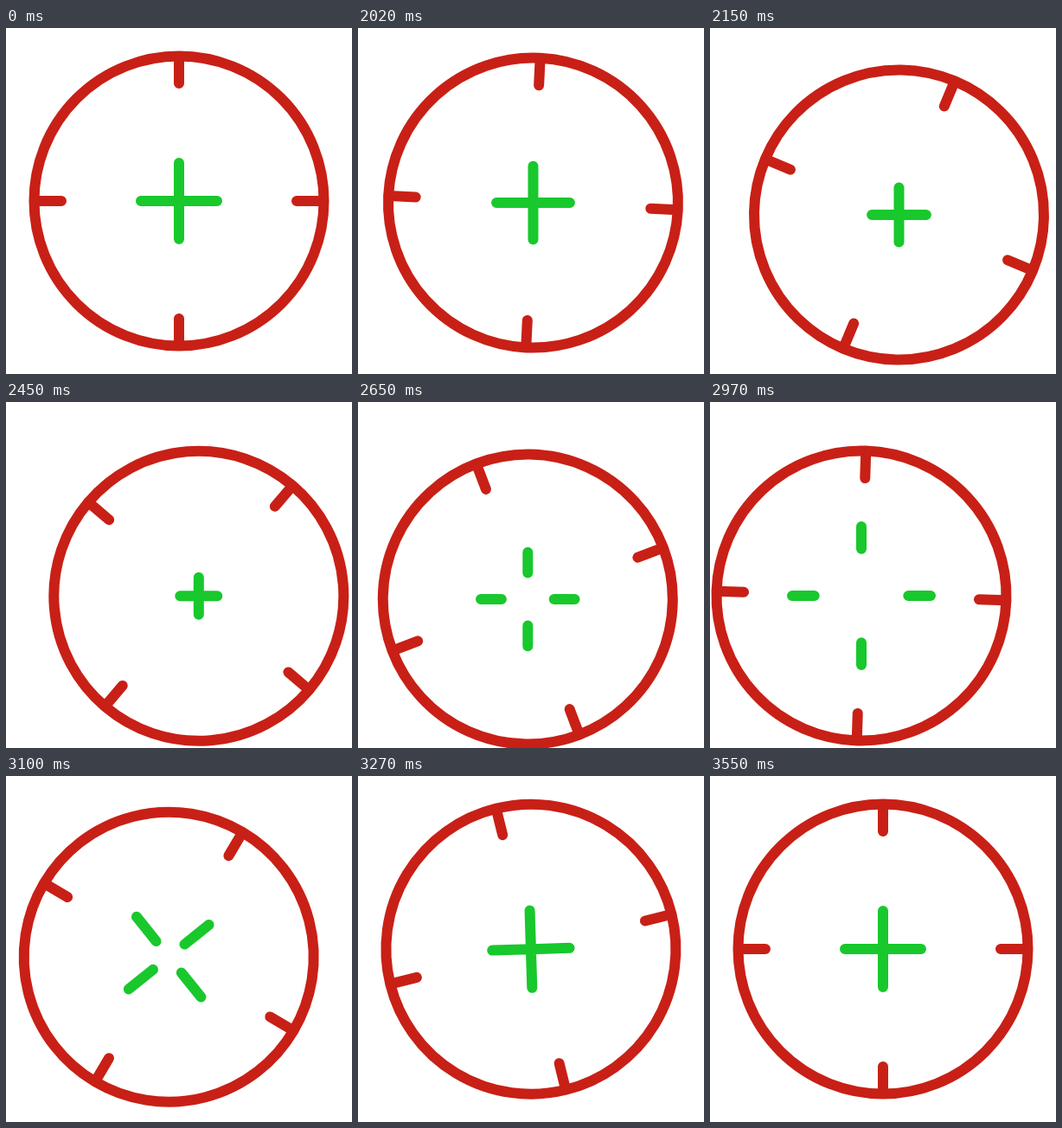
Animation of 400x400 px, one loop 3570 ms. Source, as an HTML page:

```html
<!DOCTYPE html>
<html lang="en">
<head>
<meta charset="utf-8">
<title>Crosshair</title>
<style>
  html, body { margin: 0; width: 100%; height: 100%; overflow: hidden; background: #fff; }
  svg { display: block; width: 100vw; height: 100vh; }
  g { fill: none; stroke-width: 12; stroke-linecap: round; }
</style>
</head>
<body>
<svg viewBox="-200 -200 400 400">
  <g id="ring" stroke="#c82016">
    <circle r="167.5"/>
    <path d="M0-167V-136M0 167V136M-167 0H-136M167 0H136"/>
  </g>
  <g id="cross" stroke="#18c82c"><path id="arms"/></g>
</svg>
<script>
const LOOP = 3570, HOLD = 2000, MOVE = 500, STEP = 25;
const $ = id => document.getElementById(id);
const ring = $('ring'), cross = $('cross'), arms = $('arms');

// Poses at rest: ring turn, cross spin, inner and outer end of the arms.
const poses = [
  { x: 0, y: 0, turn: 0, spin: 0, inner: 0, outer: 44 },
  { x: 22.8, y: 24.3, turn: 40.4, spin: 0, inner: 0, outer: 21.5 },
  { x: -25, y: 24, turn: 91.8, spin: 0, inner: 54.3, outer: 80 },
  { x: 0, y: 0, turn: 180, spin: 90, inner: 0, outer: 44 }
];

// Between poses: Bezier handles of the path, pull of the easing for body and ring.
const moves = [
  { x: [11.7, 25.8], y: [10.1, 20.4], pull: 3.5, ringPull: 3.5 },
  { x: [16.2, -15.8], y: [30.8, 28.3], pull: 3.5, ringPull: 3.5 },
  { x: [-29.4, -1.2], y: [19.6, 2.6], pull: 6.4, ringPull: 3 }
];

const ease = (s, pull) => 1 - (1 - s ** 1.3) ** pull;
const mix = (a, b, u) => a + (b - a) * u;
const bezier = (a, [h, k], b, u) => {
  const w = 1 - u;
  return a * w ** 3 + 3 * h * w * w * u + 3 * k * w * u * u + b * u ** 3;
};

function draw(ms) {
  const t = Math.floor((ms % LOOP + 5) / STEP) * STEP - HOLD;
  const p = Math.min(Math.max(t / MOVE, 0), moves.length);
  const i = Math.min(Math.floor(p), moves.length - 1);
  const from = poses[i], to = poses[i + 1], move = moves[i];
  const u = ease(p - i, move.pull);
  const at = key => mix(from[key], to[key], u);
  const along = key => bezier(from[key], move[key], to[key], u);

  const place = `translate(${along('x')} ${along('y')})`;
  const turn = mix(from.turn, to.turn, ease(p - i, move.ringPull));
  const a = at('inner'), b = at('outer');
  ring.setAttribute('transform', `${place} rotate(${turn})`);
  cross.setAttribute('transform', `${place} rotate(${at('spin')})`);
  arms.setAttribute('d', `M0 ${-a}V${-b}M0 ${a}V${b}M${-a} 0H${-b}M${a} 0H${b}`);
}

const start = performance.now();
function tick() {
  draw(performance.now() - start);
  requestAnimationFrame(tick);
}
tick();
</script>
</body>
</html>
```
